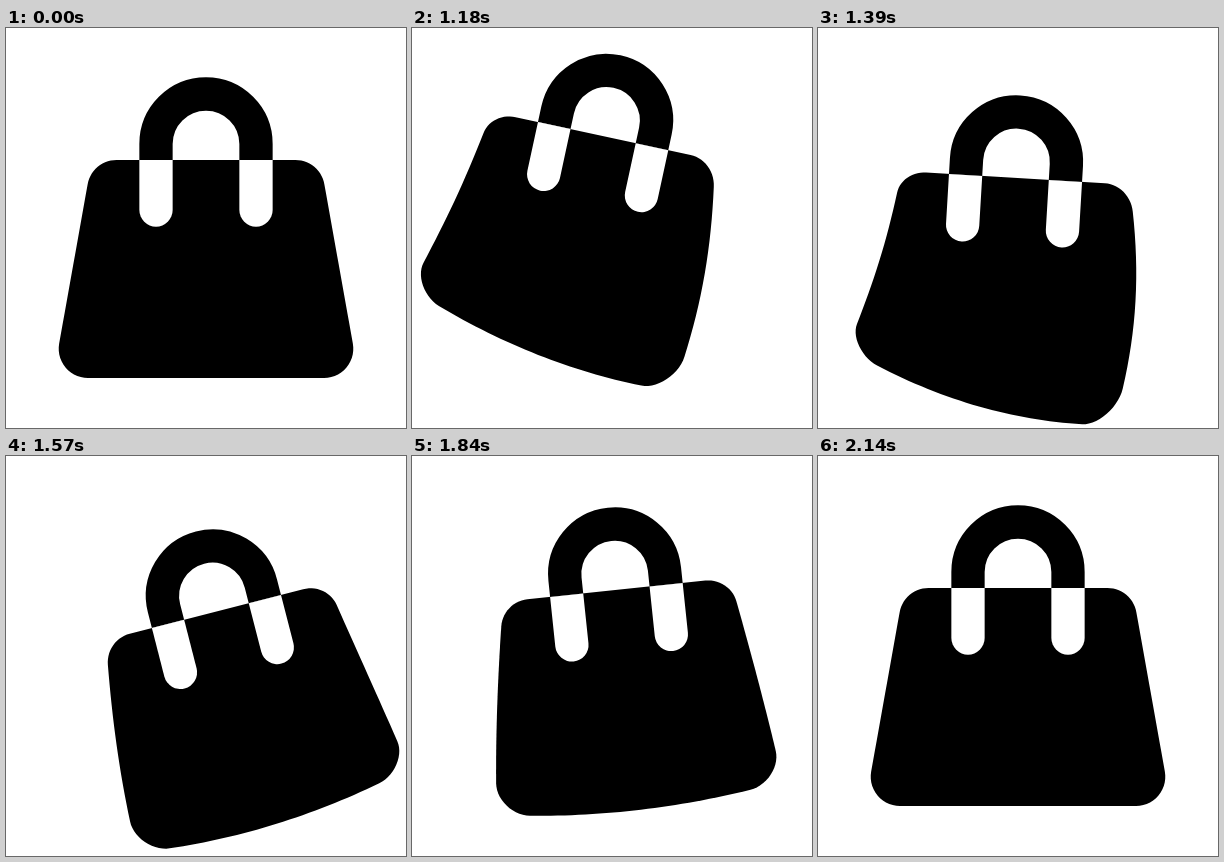
Write an HTML page with a canvas that moves like this. It is 400x400 px and loops after 2.26 s.

```html
<!DOCTYPE html>
<html lang="en">
<head>
<meta charset="utf-8">
<title>Swinging bag</title>
<style>
  html, body { margin: 0; width: 100%; height: 100%; overflow: hidden; background: #fff; }
  canvas { display: block; width: 400px; height: 400px; }
</style>
</head>
<body>
<canvas id="stage" width="400" height="400"></canvas>
<script>
const ctx = document.getElementById('stage').getContext('2d');
const LOOP = 2260, START = 1030, END = 2140, STEP = 30;
const RAD = Math.PI / 180;
const PIVOT = { x: 200, y: 90 };
const RIM = 42;            // distance from pivot down to the bag's top edge
const CORNER = 29.3;       // corner radius
const TOP = { x: 89.5, y: CORNER }, BASE = { x: 118, y: 188.7 };

// Each track is a list of [time, value]; extremes have zero speed.
const tracks = {
  angle: [[1020, 0], [1180, 12.2], [1220, 14], [1390, 3.4], [1570, -14.4],
          [1640, -17], [1840, -6], [1985, 4], [2140, 0]],
  drop: [[1020, 0], [1190, -23.2], [1390, 18], [1480, 28], [1570, 24.8],
         [1840, 2.2], [1900, 0], [2140, 0]],
  bend: [[1020, 0], [1180, 7.4], [1290, 10.8], [1390, 9.8], [1570, -2.3],
         [1660, -4], [1840, -0.6], [1985, 1], [2140, 0]],
  sag: [[1020, 0], [1180, 7], [1390, 8.7], [1570, 6.2], [1840, 5.2], [2140, 0]]
};

function slope(keys, i) {
  if (i === 0 || i === keys.length - 1) return 0;
  const rate = j => (keys[j + 1][1] - keys[j][1]) / (keys[j + 1][0] - keys[j][0]);
  const before = rate(i - 1), after = rate(i);
  return before * after <= 0 ? 0 : 2 * before * after / (before + after);
}

function sample(keys, t) {
  const last = keys.length - 1;
  if (t <= keys[0][0]) return keys[0][1];
  if (t >= keys[last][0]) return keys[last][1];
  let i = 0;
  while (t >= keys[i + 1][0]) i++;
  const [t0, a] = keys[i], [t1, b] = keys[i + 1];
  const span = t1 - t0, p = (t - t0) / span, q = 1 - p;
  return a * q * q * (1 + 2 * p) + b * p * p * (3 - 2 * p)
    + span * p * q * (slope(keys, i) * q - slope(keys, i + 1) * p);
}

// Outline of the resting body, origin at the middle of its top edge.
function buildOutline() {
  const half = [];
  const side = Math.atan2(TOP.x - BASE.x, BASE.y - TOP.y);
  const arc = (c, from, to) => {
    for (let i = 0; i <= 14; i++) {
      const a = from + (to - from) * i / 14;
      half.push([c.x + CORNER * Math.cos(a), c.y + CORNER * Math.sin(a)]);
    }
  };
  const line = (x, y) => {
    const [x0, y0] = half[half.length - 1];
    for (let i = 1; i <= 16; i++) half.push([x0 + (x - x0) * i / 16, y0 + (y - y0) * i / 16]);
  };
  arc(TOP, -Math.PI / 2, side);
  line(BASE.x + CORNER * Math.cos(side), BASE.y + CORNER * Math.sin(side));
  arc(BASE, side, Math.PI / 2);
  line(0, BASE.y + CORNER);
  return half.concat(half.map(([x, y]) => [-x, y]).reverse());
}
const outline = buildOutline();

function warp([x, y], bend, sag) {
  const u = x / BASE.x, v = Math.max(0, y) / BASE.y, k = bend * RAD;
  return [
    x * Math.cos(k * v) - BASE.y * k * v * v / 2 - u * sag * v * v + 0.3 * bend * Math.sin(Math.PI * v),
    y + x * Math.sin(k * v) + v * v * ((bend - sag) / 2 + sag * (1 - u * u))
  ];
}

function drawBody(bend, sag) {
  ctx.fillStyle = '#000';
  ctx.beginPath();
  outline.forEach(p => ctx.lineTo(...warp(p, bend, sag)));
  ctx.fill();
}

function drawHandle() {
  ctx.lineWidth = 33.3;
  ctx.strokeStyle = '#000';
  ctx.beginPath();
  ctx.moveTo(-50, 0);
  ctx.arc(0, -16, 50, Math.PI, 0);
  ctx.lineTo(50, 0);
  ctx.stroke();
  ctx.fillStyle = '#fff';
  for (const x of [-50, 50]) {
    ctx.beginPath();
    ctx.moveTo(x + 16.65, 0);
    ctx.arc(x, 50, 16.65, 0, Math.PI);
    ctx.lineTo(x - 16.65, 0);
    ctx.fill();
  }
}

function draw(t) {
  const time = t < START ? 0 : Math.min(END, START + Math.floor((t - START) / STEP) * STEP);
  const pose = name => sample(tracks[name], time);
  ctx.setTransform(1, 0, 0, 1, 0, 0);
  ctx.fillStyle = '#fff';
  ctx.fillRect(0, 0, 400, 400);
  ctx.translate(PIVOT.x, PIVOT.y + pose('drop'));
  ctx.rotate(pose('angle') * RAD);
  ctx.translate(0, RIM);
  drawBody(pose('bend'), pose('sag'));
  drawHandle();
}

const began = performance.now();
function tick() {
  draw((performance.now() - began) % LOOP);
  requestAnimationFrame(tick);
}
tick();
</script>
</body>
</html>
```
